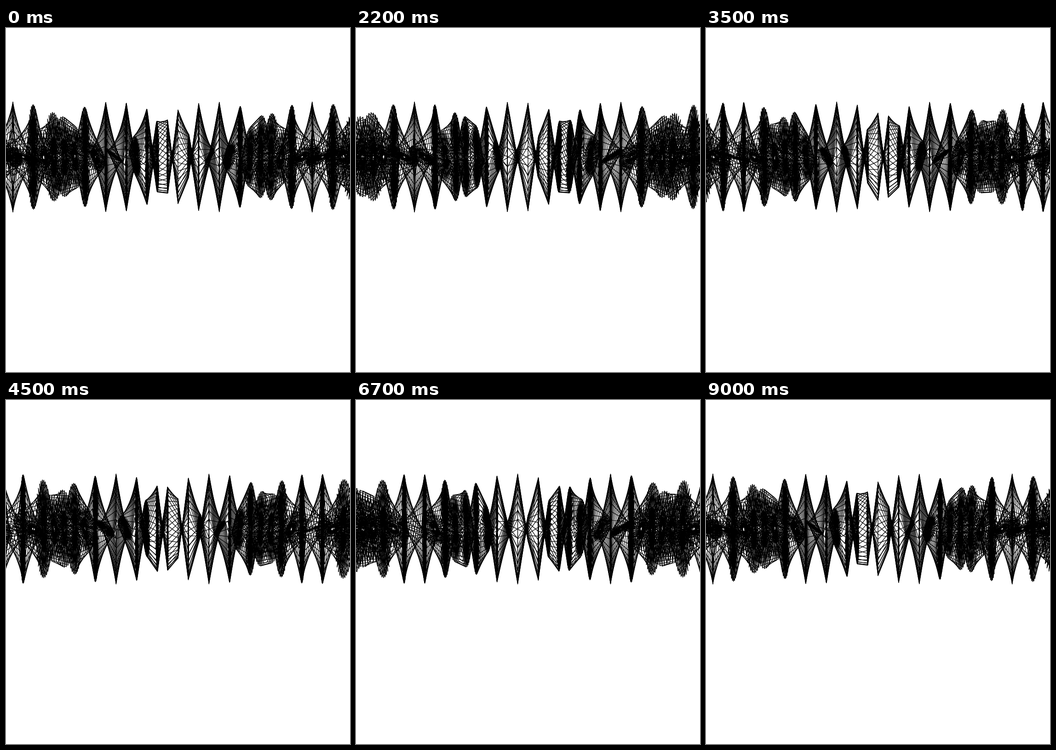
Animation of 748x748 px, one loop 9.1 s. Source, as an HTML page with a canvas:

```html
<!DOCTYPE html>
<html lang="en">
<head>
<meta charset="utf-8">
<title>Twisting wire tube</title>
<style>
  html, body { margin: 0; width: 100%; height: 100%; overflow: hidden; background: #fff; }
  canvas { display: block; }
</style>
</head>
<body>
<canvas id="stage" width="748" height="748"></canvas>
<script>
  const ctx = document.getElementById('stage').getContext('2d');
  const SIZE = 748, MID = SIZE / 2;
  const RAD = Math.PI / 180;

  const GAP = SIZE * 0.03;        // distance between rings
  const RADIUS = SIZE * 0.16;
  const LIFT = SIZE * 0.125;      // height of the axis above the eye line
  const CAMERA = MID / Math.tan(22.5 * RAD);
  const HALF = 22;                // rings on each side of the centre
  const POINTS = 36;              // points on each ring
  const POINT_STEP = 170;         // degrees, so each ring is a star polygon
  const RING_TURN = 260.73;       // degrees from ring to ring
  const STEP_MS = 100, LOOP_MS = 9100, CYCLE = 90;

  function project(x, y, z) {
    const s = CAMERA / (CAMERA - z);
    return [MID + x * s, MID - (LIFT + y) * s];
  }

  // The ring narrows in height and depth in turn.
  function ring(k, phase) {
    const p = (phase + k * RING_TURN) * RAD;
    const high = RADIUS * Math.sin(p), deep = RADIUS * Math.cos(p);
    return Array.from({ length: POINTS }, (_, j) => {
      const a = j * POINT_STEP * RAD;
      return project(k * GAP, high * Math.cos(a), deep * Math.sin(a));
    });
  }

  function trace(points) {
    points.forEach(([x, y], i) => i ? ctx.lineTo(x, y) : ctx.moveTo(x, y));
  }

  function draw(step) {
    const phase = 122 - 2 * (step % CYCLE);
    const rings = [];
    for (let k = -HALF; k <= HALF; k++) rings.push(ring(k, phase));

    ctx.fillStyle = '#fff';
    ctx.fillRect(0, 0, SIZE, SIZE);
    ctx.strokeStyle = '#000';
    ctx.lineWidth = 1.25;
    ctx.lineJoin = 'round';
    for (const r of rings) {
      ctx.beginPath();
      trace(r);
      ctx.closePath();
      ctx.stroke();
    }
    for (let j = 0; j < POINTS; j++) {
      ctx.beginPath();
      trace(rings.map(r => r[j]));
      ctx.stroke();
    }
  }

  let shown = -1;
  function tick() {
    const step = Math.floor((performance.now() % LOOP_MS) / STEP_MS);
    if (step !== shown) draw(shown = step);
    requestAnimationFrame(tick);
  }
  tick();
</script>
</body>
</html>
```
